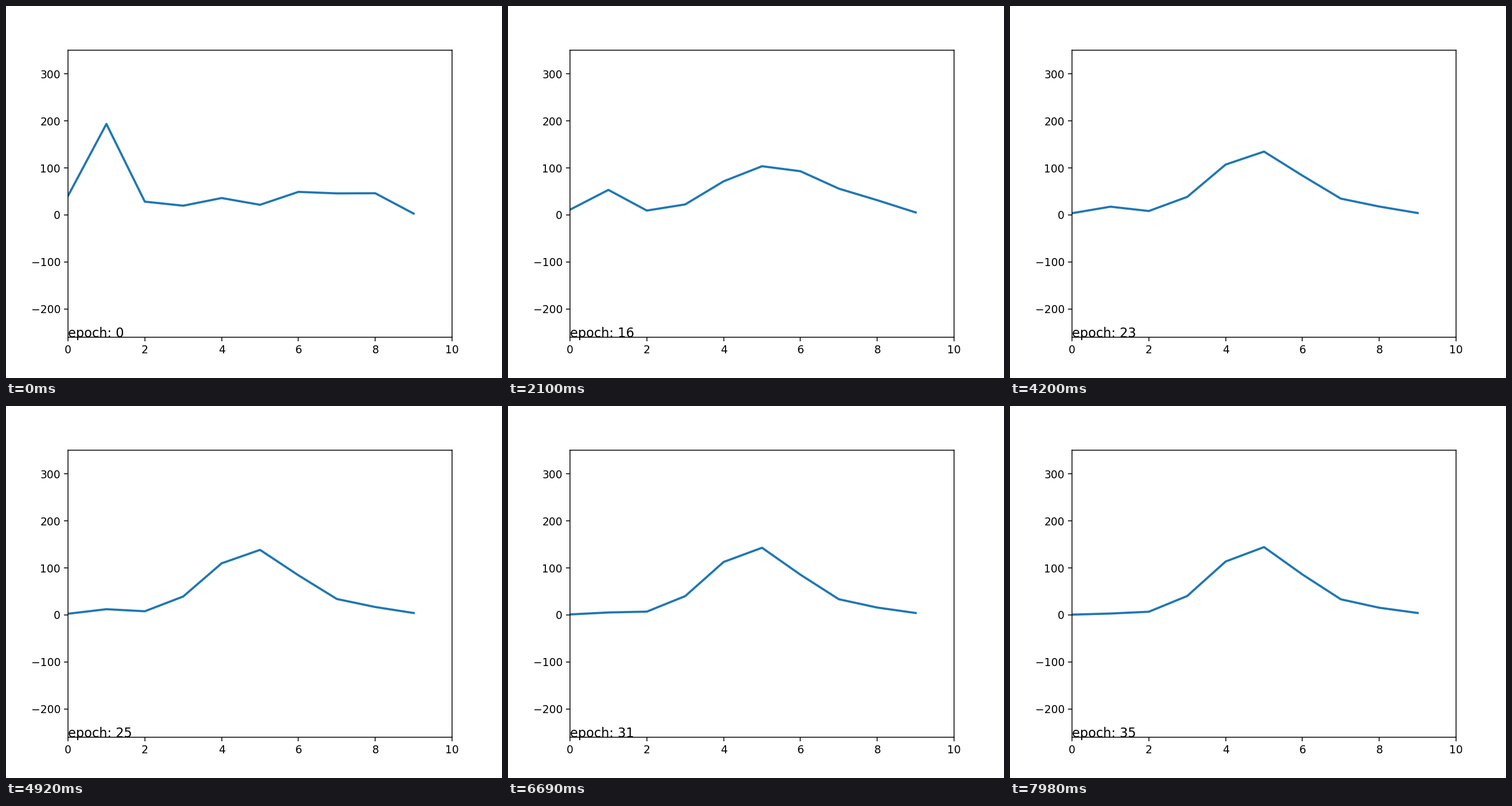
Animation, 864 px wide and 648 px high, one loop 8000 ms. Source, as a matplotlib script:

```python
import numpy as np
import matplotlib.pyplot as plt
from matplotlib.animation import FuncAnimation

W, H, DPI = 864, 648, 135
LOOP, TICK, STEP = 8000, 20, 30   # ms: loop, timer tick, time per drawn state

x = np.arange(10)


def bell(center, sharp):
    return np.exp(-sharp * (x - center) ** 2)


# Rough first guess, the skewed bell it settles into, and a passing sideways lean
start = np.array([40.4, 193.6, 28.2, 19.6, 35.9, 21.5, 49, 45.8, 46.1, 2.8])
goal = 148 * bell(4.8, 0.4) + 14 * bell(7.55, 0.6)
lean = 41 * (x - 5.3) * bell(5.3, 0.31)


def curve(n):
    left = np.exp(-0.0268 * n ** 0.912)
    sway = n / 24 * np.exp(-(n / 58) ** 2)
    return goal + (start - goal) * left + lean * sway


def epoch(n):
    # fast at first, then a steady pace
    return int(1.95 * np.sqrt(min(n, 98)) + 0.0985 * max(n - 98, 0))


fig, ax = plt.subplots(figsize=(W / DPI, H / DPI), dpi=DPI)
fig.subplots_adjust(left=0.125, right=777 / W, bottom=0.11, top=570.6 / H)
ax.set_xlim(0, 10)
ax.set_ylim(-260, 350)
line, = ax.plot(x, curve(0), color="#1f77b4", lw=2)
label = ax.text(0, -260, "epoch: 0", fontsize=12)


def update(i):
    n = (i * TICK + TICK // 2) // STEP
    line.set_ydata(curve(n))
    label.set_text(f"epoch: {epoch(n)}")
    return line, label


anim = FuncAnimation(fig, update, frames=LOOP // TICK, interval=TICK,
                     repeat=True, repeat_delay=0, blit=False)
plt.show()
```
